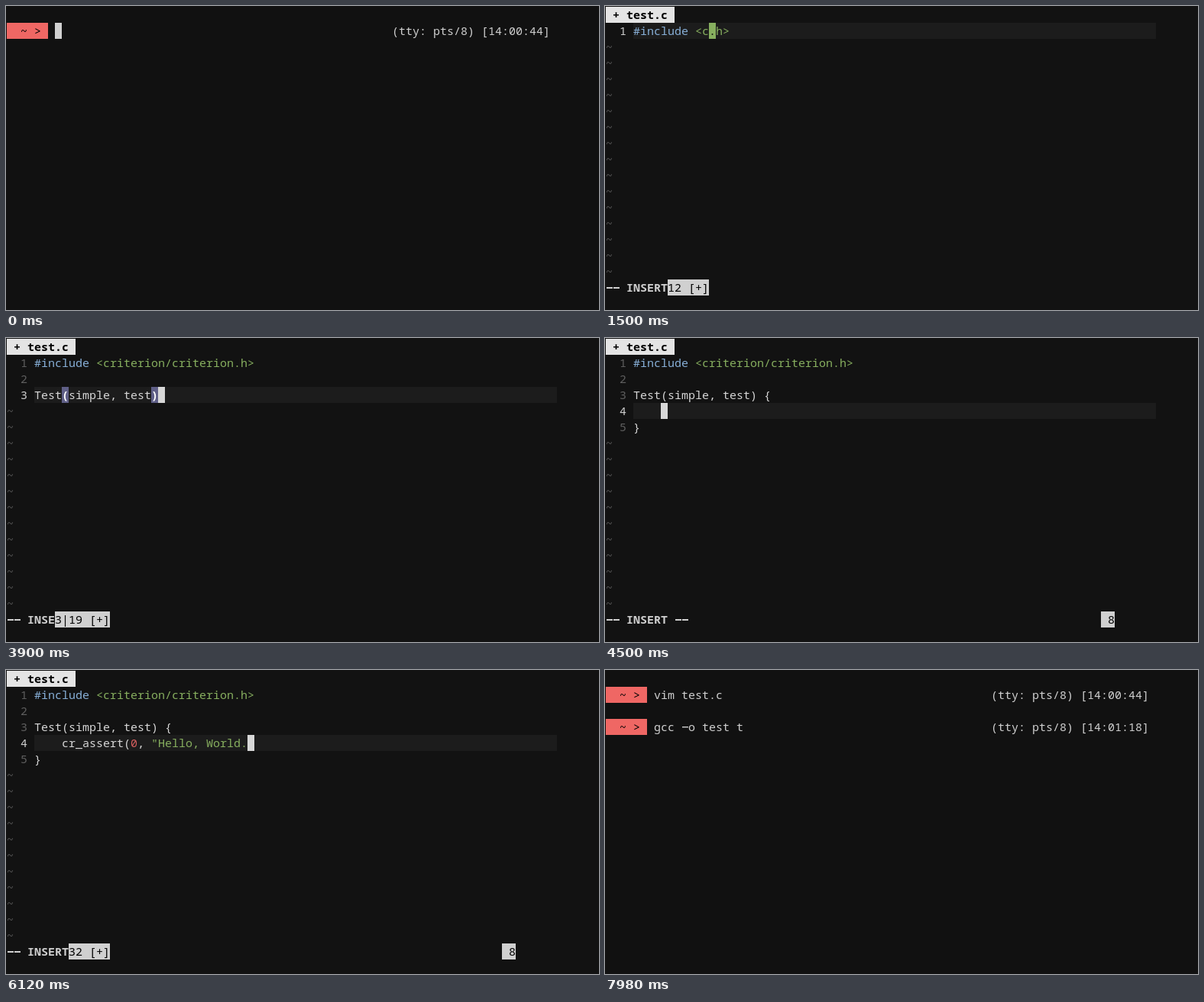
These frames come from a looping animation (776 by 398 pixels, 8000 ms). An HTML page with a canvas:

```html
<!DOCTYPE html>
<html lang="en">
<head>
<meta charset="utf-8">
<title>Terminal session</title>
<style>
html, body { margin: 0; width: 100%; height: 100%; overflow: hidden; background: #111; }
canvas { display: block; }
</style>
</head>
<body>
<canvas id="stage" width="776" height="398"></canvas>
<script>
const ctx = document.getElementById('stage').getContext('2d');
const LOOP = 8000, KEY = 60;
const CW = 9, CH = 21, ORIGIN = 1, BASE = 16;
const FONT = '15px "Noto Sans Mono", "DejaVu Sans Mono", monospace';
const C = {
  shell: '#111111', vim: '#121212', line: '#1c1c1c', text: '#d7d7d7', dim: '#5f5f5f',
  lineNo: '#d0d0d0', tilde: '#585858', pre: '#87afd7', str: '#87af5f', num: '#d75f5f',
  match: '#5f5f87', bar: '#d0d0d0', tab: '#e4e4e4', prompt: '#ef6764', pick: '#444444'
};

const cellX = col => ORIGIN + col * CW;
const cellY = row => ORIGIN + row * CH;

function fill(col, row, cells, color) {
  ctx.fillStyle = color;
  ctx.fillRect(cellX(col), cellY(row), cells * CW, CH);
}

function write(col, row, text, color = C.text, bold = false) {
  ctx.font = (bold ? 'bold ' : '') + FONT;
  ctx.fillStyle = color;
  [...text].forEach((ch, i) => {
    const x = cellX(col + i), y = cellY(row) + BASE;
    // the terminal font has a wide hyphen
    if (ch === '-') ctx.fillRect(x + 1, y - 6, 8, bold ? 2 : 1.4);
    else if (ch !== ' ') ctx.fillText(ch, x, y);
  });
}

function block(col, row, text, bg, color = '#000', bold = false) {
  fill(col, row, text.length, bg);
  write(col, row, text, color, bold);
}

function background(color) {
  ctx.fillStyle = color;
  ctx.fillRect(0, 0, 776, 398);
}

// Part of text typed by time t, one key per step
function typed(text, start, t) {
  return text.slice(0, Math.max(0, Math.floor((t - start) / KEY) + 1));
}

// ---- Shell ----

function prompt(row, command, clock) {
  block(0, row, '  ~ > ', C.prompt);
  write(7, row, command, '#d0d0d0');
  if (clock) write(56, row, `(tty: pts/8) [${clock}]`, '#d0d0d0');
}

function shellStart(t) {
  background(C.shell);
  const command = typed('vim test.c', 120, t);
  prompt(1, command, '14:00:44');
  if (t < 720) fill(7 + command.length, 1, 1, C.bar);
  else fill(0, 2, 1, C.bar);
}

function shellEnd(t) {
  background(C.shell);
  prompt(1, 'vim test.c', '14:00:44');
  if (t >= 7020) prompt(3, typed('gcc -o test t', 7260, t), t >= 7080 && '14:01:18');
}

// ---- Editor ----

const INCLUDE = 'criterion/criterion';
const HEAD = 'Test(simple, test) {';
const CALL = 'cr_assert(0, "Hello, World.");';

// Lines, cursor and mode at time t
function editorState(t) {
  const s = { lines: [''], row: 0, col: 0, insert: t >= 960, moved: false, cursor: true };
  if (t < 1260) {
    s.lines[0] = typed('inc', 1080, t);
    s.col = s.lines[0].length;
    return s;
  }
  const name = t < 1500 ? 'stdio' : typed(INCLUDE, 1500, t);
  s.lines[0] = `#include <${name}.h>`;
  s.col = t < 1500 ? 10 : 10 + name.length;
  s.picked = t < 1500;
  if (t < 2640) return s;

  s.moved = true;
  s.cursor = t >= 2820;
  s.lines.push('');
  s.row = 1;
  s.col = 0;
  if (t < 2760) return s;

  s.lines.push(typed(HEAD, 2880, t));
  s.row = 2;
  s.col = s.lines[2].length;
  if (t < 4080) return s;

  s.row = 3;
  if (t < 4440) {
    s.lines.push(t < 4200 ? '' : '}');
    s.insert = t < 4320;
    s.col = t < 4200 ? 4 : s.insert ? 1 : 0;
    return s;
  }
  s.lines.push('    ' + typed(CALL, 4560, t), '}');
  s.col = s.lines[3].length;
  s.moved = false;
  s.insert = t < 6360;
  if (!s.insert) s.col--;
  s.cursor = t < 6420;
  return s;
}

function colorAt(line, row, i) {
  if (row === 0 && line[0] === '#') return i < 9 ? C.pre : C.str;
  const open = line.indexOf('"'), close = line.indexOf('"', open + 1);
  if (open >= 0 && i >= open && (close < 0 || i <= close)) return C.str;
  return line[i] === '0' ? C.num : C.text;
}

// Bracket pair closing just before (or under) the cursor
function brackets(s) {
  const line = s.lines[s.row];
  const at = s.insert ? s.col - 1 : s.col;
  if (line[at] === ')') return [[s.row, line.lastIndexOf('(', at)], [s.row, at]];
  if (line[at] === '}') return [[2, HEAD.length - 1], [s.row, at]];
  return [];
}

function statusLine(s, t) {
  if (!s.insert) {
    if (t < 960) write(0, 17, '"test.c" [New File]');
    else if (t >= 6720) write(0, 17, '"test.c" [New] 5L, 92C written');
    else if (t >= 6420) write(0, 17, typed(':wq', 6420, t));
    return;
  }
  write(0, 17, '-- INSERT', C.bar, true);
  const fresh = t < 1080 || (t >= 4440 && t < 4560);
  if (fresh) {
    write(10, 17, '--', C.bar, true);
  } else {
    const ruler = `${s.row + 1}|${s.col + 1} [+]`.padEnd(8);
    const from = s.moved ? 0 : 2;
    block(7 + from, 17, ruler.slice(from), C.bar);
  }
  if (t >= 4440) block(72, 17, ' 8', C.bar);
}

function editor(t) {
  const s = editorState(t);
  background(C.vim);
  block(0, 0, t < 1080 ? ' test.c ' : ' + test.c ', C.tab, '#000', true);
  fill(4, s.row + 1, 76, C.line);
  if (s.picked) fill(14, 1, 5, C.pick);

  s.lines.forEach((line, r) => {
    const label = s.insert ? r + 1 : Math.abs(r - s.row);
    write(2, r + 1, String(label), r === s.row ? C.lineNo : C.dim);
    [...line].forEach((ch, i) => write(4 + i, r + 1, ch, colorAt(line, r, i)));
  });
  for (let r = s.lines.length + 1; r < 17; r++) write(0, r, '~', C.tilde);

  for (const [r, i] of brackets(s)) {
    block(4 + i, r + 1, s.lines[r][i], C.match, '#fff', true);
  }
  if (s.cursor) {
    const line = s.lines[s.row], under = line[s.col] || ' ';
    const color = under === ' ' ? C.text : colorAt(line, s.row, s.col);
    block(4 + s.col, s.row + 1, under, color, C.vim);
  }
  statusLine(s, t);
}

function draw(now) {
  const t = Math.floor((now % LOOP) / KEY + 1e-6) * KEY;
  if (t < 780) shellStart(t);
  else if (t < 6960) editor(t);
  else shellEnd(t);
}

const began = performance.now();
function frame() {
  draw(performance.now() - began);
  requestAnimationFrame(frame);
}
frame();
</script>
</body>
</html>
```
